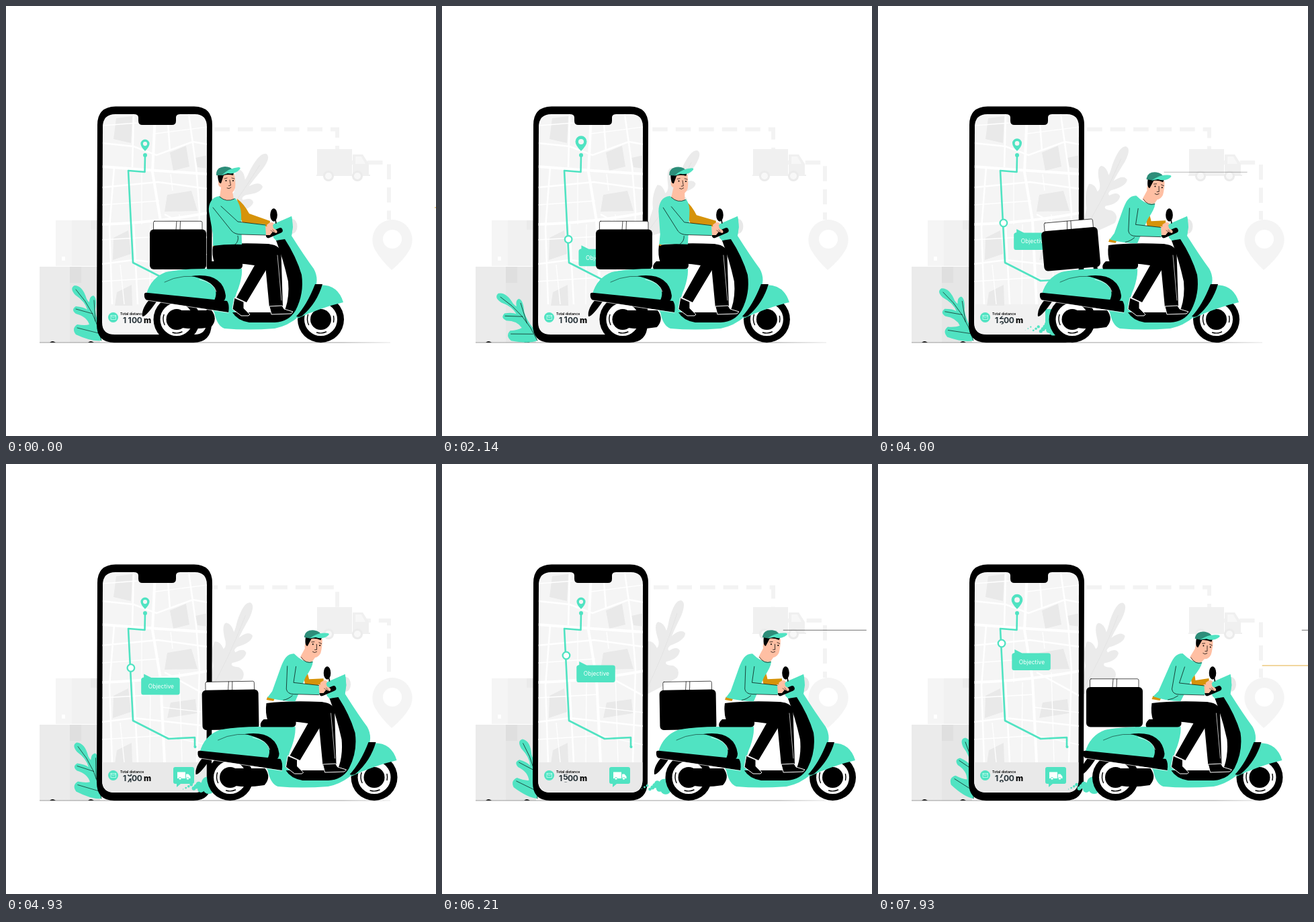
Recreate the animation shown at these times as an HTML page. Size 640x640 px, loop 8000 ms.

```html
<!DOCTYPE html>
<html lang="en">
<head>
<meta charset="utf-8">
<title>Delivery tracking</title>
<style>
html, body { margin: 0; width: 100%; height: 100%; overflow: hidden; background: #fff; }
svg { display: block; width: 100vw; height: 100vh; }
text { font-family: Inter, "Open Sans", sans-serif; }
.teal { fill: #50e3c2; }
.skin { fill: #ffbfa3; }
.gold { fill: #d6930a; }
.line { fill: none; stroke: #000; stroke-width: .7; stroke-linecap: round; stroke-linejoin: round; }
.num { font-weight: 700; font-size: 12px; fill: #263238; text-anchor: middle; }
</style>
</head>
<body>
<svg viewBox="0 0 640 640">
  <defs>
    <clipPath id="screen"><path d="M163 161H281Q299 161 299 180L298.500 471Q298 489 280 489H162Q143 489 143 471L144 180Q144 161 163 161Z"/></clipPath>
    <clipPath id="slot"><rect x="180" y="461.800" width="8.200" height="11.600"/></clipPath>
    <linearGradient id="fade"><stop offset=".86" stop-color="#777"/><stop offset="1" stop-color="#ddd"/></linearGradient>
    <g id="wheel">
      <circle r="34.500"/>
      <circle r="24.500" fill="#fff"/>
      <circle r="15.500"/>
      <path class="line" stroke-width="1.300" style="stroke-width:1.400" d="M-19 -7A20 20 0 0 0 -18 8M-6 19.500A20 20 0 0 0 8 18.500M19 4A20 20 0 0 0 19 -5"/>
    </g>
  </defs>

  <!-- backdrop -->
  <g fill="none" stroke="#f3f3f3" stroke-width="6" stroke-dasharray="22.500 12">
    <path class="dash" d="M276 183.500H493V213"/>
    <path class="dash" d="M503.500 233H570V318"/>
  </g>
  <g fill="#f0f0f0">
    <path d="M463 213H515V252H463ZM516 221H531L540 235V252H516Z"/>
    <path fill="#f7f7f7" d="M520 224H529L535 235H520Z"/>
    <path d="M462 251H542V253H462Z"/>
    <g fill="#f8f8f8" stroke="#ebebeb" stroke-width="3"><circle cx="480" cy="253" r="6.500"/><circle cx="523" cy="253" r="6.500"/></g>
  </g>
  <path fill="#f4f4f4" fill-rule="evenodd" d="M575 318A30 30 0 0 1 600 364Q592 378 574 393Q558 378 550 364A30 30 0 0 1 575 318ZM575 333A14 14 0 1 0 575 361A14 14 0 1 0 575 333Z"/>
  <g id="greyLeaf">
    <path fill="#ebebeb" d="M300 345Q322 335 350 318Q356 306 344 300Q330 300 334 294Q352 290 354 278Q350 270 338 278Q334 275 340 270Q362 262 362 252Q356 244 342 256Q346 246 356 226Q364 206 356 203Q346 202 338 232Q336 244 334 248Q330 236 322 235Q314 238 322 262Q324 270 320 274Q314 262 306 264Q300 280 306 300Z"/>
    <path fill="none" stroke="#e0e0e0" stroke-width=".7" d="M302 340Q328 290 350 222"/>
  </g>
  <path fill="#f5f5f5" d="M74 319H137V388H74Z"/>
  <path fill="#f1f1f1" d="M98 319H137V388H98Z"/>
  <path fill="#ebebeb" d="M126 319H137V333H126Z"/>
  <path fill="#fff" d="M83 373H88V379H83ZM74 387H137V388H74Z"/>
  <path fill="#ebebeb" d="M50 388H140V501H50Z"/>
  <path fill="#e6e6e6" d="M95 388H140V501H95Z"/>
  <path fill="#dfdfdf" d="M95 388H112V412H95Z"/>
  <path d="M65 501Q69 497 74 501ZM122 501Q126 497 131 501Z"/>
  <rect x="50" y="500.600" width="522" height=".7" fill="url(#fade)"/>
  <path id="dark" stroke="#333" stroke-width=".7"/>
  <path id="amber" stroke="#e0a526" stroke-width=".9"/>

  <g id="leaf">
    <path class="teal" d="M142 498Q128 500 104 489Q97 480 106 474Q118 476 124 474Q120 462 104 458Q96 452 104 447Q116 448 121 452Q118 440 103 430Q94 420 102 416Q114 416 120 436Q122 440 124 441Q124 432 130 431Q136 434 133 452Q134 466 140 478Z"/>
    <path class="line" style="stroke-width:.6" d="M142 498Q134 455 104 422M133 469L131 438M129 458L104 451M138 487L106 479"/>
  </g>

  <!-- phone -->
  <path d="M163 149.500H280Q307 150 307 177L306 474Q305 501 279 501H161Q135 501 135 474L136 177Q136 150 163 149.500Z"/>
  <g clip-path="url(#screen)">
    <path fill="#f5f5f5" d="M140 158H302V492H140Z"/>
    <path fill="#e9e9e9" d="M164 167L188 164L186 204L160 198ZM244 218L268 208L273 239L249 245ZM240 281L276 275L285 305L236 306ZM160 345L182 334L186 369L159 378ZM245 355L282 350L284 371L240 378ZM165 426L187 415L188 446L162 446ZM282 226L300 222V242L285 240Z"/>
    <g fill="none" stroke="#fff">
      <path stroke-width="4" d="M143 239Q220 245 300 250M222 161L218 247L230 320L236 444M143 325Q220 323 300 308"/>
      <path stroke-width="2.500" d="M143 204L190 209L224 222L278 202L300 206M190 161L188 240M143 270L226 262L300 272M236 310L300 345M143 384L190 378L300 390M161 240L154 330L158 444M190 325L196 444M240 161L244 215M272 161L283 240L288 305L284 444"/>
      <path stroke-width="1.300" d="M143 178L222 172M222 190L300 180M143 296L228 290M202 244V325M143 348L232 343M232 362L300 370M143 410L235 404L300 418M215 325L214 444M258 310L262 444M245 250L248 275M170 385L176 444"/>
    </g>
    <g class="teal">
      <path fill="none" stroke="#50e3c2" stroke-width="2.600" stroke-linejoin="round" d="M207 222L206.500 247L182 245L189 382L242 409L281 407V421"/>
      <circle cx="207" cy="222" r="3"/><circle cx="281.500" cy="421" r="2"/>
      <path id="pin" fill-rule="evenodd" d="M0 0Q-9 -9 -9 -15A9 9 0 0 1 9 -15Q9 -9 0 0ZM0 -19.200A4.300 4.300 0 1 0 0 -10.600A4.300 4.300 0 1 0 0 -19.200Z"/>
    </g>
    <circle id="ring" r="5.300" fill="#fff" stroke="#50e3c2" stroke-width="2.300"/>
    <g id="bubble">
      <path class="teal" d="M4 -4.500L15 1H54Q57.500 1 57.500 4V23Q57.500 26.500 54 26.500H3Q0 26.500 0 23V4Q0 1 4 .5Z"/>
      <text id="goal" x="10.500" y="17" font-size="8.400" letter-spacing=".1" fill="#fff">Objective</text>
    </g>
    <path id="panel" fill="#e9e9e9" d="M140 444H302V492H140Z"/>
    <circle class="teal" cx="159.500" cy="463.500" r="7.500"/>
    <path fill="none" stroke="#d8fff6" stroke-width=".7" d="M156 460.500H163.500V466.500H156ZM156 460.500L158 463H161.500L163.500 460.500"/>
    <text x="170" y="460" font-size="5.200" font-weight="600">Total distance</text>
    <g class="num">
      <text x="176.500" y="472.300">1</text>
      <g clip-path="url(#slot)"><g id="reel"></g></g>
      <text x="191" y="472.300">0</text><text x="198.700" y="472.300">0</text>
      <text x="210.500" y="472.300" fill="#000" font-weight="800">m</text>
    </g>
    <path class="teal" d="M252 451H277Q280 451 280 454V473Q280 476 277 476H260L254 481V476H252Q249 476 249 473V454Q249 451 252 451Z"/>
    <path fill="#fff" d="M255 458.500H267V468H255ZM268 461.500H271.500L274.500 465V468H268Z"/>
    <g fill="#fff" stroke="#50e3c2" stroke-width=".8"><circle cx="259" cy="468.300" r="1.900"/><circle cx="270.500" cy="468.300" r="1.900"/></g>
  </g>
  <path d="M190 158H259V161Q253 161 253 166V171Q253 177 247 177H203Q197 177 197 171V166Q197 161 190 161Z"/>

  <g id="smoke" class="teal"></g>

  <!-- scooter and rider -->
  <g id="ride">
    <path d="M216 434Q201 450 203 462Q208 463 224 440Z"/>
    <use href="#wheel" x="254" y="466.500"/>
    <path d="M250 453L306 453Q316 466 305 478Q280 482 262 479Z"/>
    <use href="#wheel" x="468.500" y="466.500"/>
    <g id="box">
      <path d="M287 385H293V401H287Z"/>
      <path class="line" style="fill:#fff" d="M221 319.800H290Q292 320 292 322V333H219.500V322Q219.500 320 221 319.800ZM254 320L253 333M259.500 320L259 333"/>
      <rect x="214" y="332" width="84" height="59.500" rx="6"/>
    </g>
    <ellipse cx="426" cy="328" rx="7.500" ry="11" fill="#e8e8e8"/>
    <!-- body -->
    <path class="teal" d="M238 396Q262 391 300 391H351Q352 402 346 420Q337 440 340 454Q352 466 368 469H406Q424 464 430 452Q440 430 434 405Q424 372 403 350L398 345L397 325L425 313L427 329L425 342Q444 372 458 391Q466 405 460 422Q452 446 436 462Q420 476 400 480Q360 483 325 480Q314 476 310 456L300 440L209 429Q216 404 238 396Z"/>
    <path d="M402 349L415 347Q432 373 440 400Q444 428 431 453Q421 470 400 471H362Q344 468 337 456H395Q410 458 416 450Q422 432 420 410Q413 378 402 349Z"/>
    <path class="teal" d="M209 429Q216 404 240 396Q280 388 306 402Q322 411 325 430L322 440Z"/>
    <path d="M276 402Q322 396 327 431Q327 438 322 440L310 438Q322 412 276 402Z"/>
    <path class="line" d="M236 411Q262 397 300 405" style="stroke-width:.5"/>
    <path class="line" d="M288 407Q309 411 313 425" style="stroke:#fff"/>
    <path d="M206 428Q207 426 212 427L329 439Q333 445 331 456L210 438Q205 436 206 428Z"/>
    <path class="line" style="stroke:#fff" d="M210 438L331 456.500"/>
    <!-- front fender -->
    <path class="teal" d="M434 465Q446 444 460 416Q493 411 502 441Q468 449 434 465Z"/>
    <path d="M432 462Q448 445 460 414L471 414Q463 442 441 461Q437 464 432 462Z"/>
    <path d="M304 380H346Q353 380 352 387Q351 392 345 391.500H300Q297 386 304 380Z"/>
    <path id="farArm" class="gold"/>
    <!-- legs -->
    <path d="M385 354Q409 354 409.500 369L412 447L392 449L386 386L378 360Z"/>
    <g stroke="#fff" stroke-width="1">
      <path d="M392 447L411 446L414 451L427 455L424 458L395 459Z"/>
      <path d="M340 434L354 440V450L363 459L361 461L350 461L337 451Z"/>
    </g>
    <path d="M308 356Q340 352 389 354Q404 356 399 373L358 441L343 434L370 386Q345 382 310 382Q306 370 308 356Z"/>
    <path class="line" style="stroke:#fff" d="M404 371L410 438M341 435L355 441"/>
    <path id="waist" class="gold"/>
    <path id="neck" class="skin"/>
    <path id="torso" class="teal"/>
    <path id="collar" class="line"/>
    <g id="head">
      <path class="skin" d="M319 250H340Q342 262 341 271Q338 280 330 279Q322 277 320 270Q315 268 316 262Z"/>
      <path d="M315 249Q326 246 339 248L338 252Q331 250 324 252L322 258L320 264Q315 264 315 249Z"/>
      <path fill="#2d8d79" d="M313 252Q312 240 326 239Q335 239 338 245L322 252Z"/>
      <path class="teal" d="M321 252Q332 241 346 240Q350 240 348 243Q341 251 330 249Z"/>
      <path class="line" d="M325 257L329 256M336 256L340 257M333 259L334.500 267L331.500 267.500M329 271Q332 273 335 270"/>
      <circle cx="327.500" cy="260" r="1"/><circle cx="338" cy="260" r="1"/>
    </g>
    <!-- handlebar -->
    <path class="skin" d="M388 326Q394 320 398 323L400 332L390 333Z"/>
    <ellipse cx="398.500" cy="311" rx="5.300" ry="9.700"/>
    <path class="line" style="stroke-width:1.600" d="M401 318L403.500 332"/>
    <path class="teal" d="M397 326L425 313Q428 322 425 342L402 349Z"/>
    <path class="line" style="stroke-width:7.500" d="M390.500 341.500L408 334"/>
    <path class="skin" d="M385 328Q395 327 403 334Q405 338 401 338L397 336L393 341H386Z"/>
    <path class="line" style="stroke-width:.5" d="M397 336L394 334M401 338L397 333"/>
    <path id="arm" class="teal"/>
    <path id="armLine" class="line"/>
  </g>
</svg>
<script>
const LOOP = 8000;
const $ = id => document.getElementById(id);
const set = (el, name, value) => el.setAttribute(name, value);
const clamp = v => Math.max(0, Math.min(1, v));

// Smooth track through [time, value] pairs, without overshoot
function track(...k) {
  const d = i => (k[i + 1][1] - k[i][1]) / (k[i + 1][0] - k[i][0]);
  const slope = i => {
    if (i === 0 || i === k.length - 1) return 0;
    const a = d(i - 1), b = d(i);
    return a * b <= 0 ? 0 : 2 * a * b / (a + b);
  };
  return t => {
    const last = k.length - 1;
    if (t <= k[0][0]) return k[0][1];
    if (t >= k[last][0]) return k[last][1];
    let i = 0;
    while (t > k[i + 1][0]) i++;
    const h = k[i + 1][0] - k[i][0], u = (t - k[i][0]) / h, w = 1 - u;
    return w * w * ((1 + 2 * u) * k[i][1] + u * h * slope(i))
      + u * u * ((3 - 2 * u) * k[i + 1][1] - w * h * slope(i + 1));
  };
}

const rideX = track([-600, -2], [0, 0], [1210, 7], [2570, 17.5], [3070, 18.7], [4000, 35], [4930, 79.5], [5140, 90], [6210, 113], [6500, 114.5], [7930, 99.5], [8300, 96]);
const lean = track([1210, 0], [3070, .5], [4000, .87], [6210, .86], [7930, 1]);
const boxX = track([0, 0], [1210, .3], [3070, -.5], [4000, -4], [4930, -1.5], [6210, -3], [7930, -3.5]);
const boxY = track([3070, .5], [4000, 0], [4930, 4], [6210, 4], [7930, 0]);
const boxTurn = track([3070, 0], [4000, -5], [4930, -1], [6210, -1], [7930, 0]);
const leafTurn = track([0, 0], [1210, -12.8], [1900, -14], [3070, -10], [4000, -5.5], [4930, 2.3], [6210, 12], [7930, 18.5]);
const greyTurn = track([0, 13.5], [1210, 12.1], [3070, 8.1], [4000, 5.6], [4930, 3.1], [6210, 0], [7930, 3.5]);
const pinSize = track([0, .73], [1210, 1], [3070, .85], [4000, .78], [4930, .73], [6210, .73], [7930, .93]);
const ringY = track([0, 359], [1210, 354], [3070, 338], [4000, 323], [4930, 303.5], [6210, 285], [7930, 267]);
const digit = track([1500, 1], [3070, 1.6], [4000, 2.5], [4930, 3.6], [6210, 5.2], [7930, 7.45]);
const smokeSize = track([2700, 0], [3070, .25], [4000, .6], [4930, 1]);

// Upright and leaning pose of each morphing part
const poses = {
  torso: ["M318 283C306 284 301 294 302 306L308 340L308 357Q330 354 351 355L350 310Q349 294 341 286Q328 294 318 283Z",
          "M354 282C343 282 339 290 333 304L318 338L310 346Q330 353 351 353L369 318Q381 304 383 295Q370 298 354 282Z"],
  neck: ["M320 270L318 285Q328 294 339 287L337 276Z", "M374 272L365 287Q372 300 382 295L390 286Z"],
  collar: ["M318 284Q328 293 340 287", "M366 288Q373 299 382 296"],
  farArm: ["M344 287Q354 294 362 309L393 320L392 330L352 322L346 310Z", "M371 310Q372 314 373 322L393 319L394 332L368 330L366 318Z"],
  waist: ["M308 356L310 356L309 358L308 358Z", "M310 345L322 348L320 352L308 350Z"],
  arm: ["M306 290Q300 302 312 316L336 335Q341 340 350 340L387 341L386 325L349 322L330 298Z",
        "M348 290Q342 302 341 316L338 335Q339 343 349 343L387 344L386 330L350 326L362 302Z"],
  armLine: ["M308 300L336 335Q341 340 350 340L386 341M320 298L345 321L386 326M345 342Q347 350 341 355",
            "M344 301L338 335Q339 343 349 343L386 344M357 302L349 326L386 330M347 345Q340 350 332 351"]
};
const morph = (a, b, u) => {
  const n = b.match(/[\d.]+/g);
  let i = 0;
  return a.replace(/[\d.]+/g, v => (+v + (n[i++] - v) * u).toFixed(2));
};

const add = (parent, name) => parent.appendChild(document.createElementNS("http://www.w3.org/2000/svg", name));
for (let n = 0; n < 10; n++) {
  const el = add($("reel"), "text");
  el.textContent = n;
  set(el, "x", 184);
  set(el, "y", 472.3 + n * 12);
}
const puffs = Array.from({ length: 14 }, () => add($("smoke"), "circle"));
const dashes = document.querySelectorAll(".dash");

function streak(el, x, y, opacity) {
  set(el, "d", `M${x} ${y}h124`);
  set(el, "opacity", clamp(opacity));
}

function draw(t) {
  const x = rideX(t), l = lean(t);
  set($("ride"), "transform", `translate(${x} 0)`);
  set($("box"), "transform", `translate(${boxX(t)} ${boxY(t)}) rotate(${boxTurn(t)} 256 361)`);
  set($("head"), "transform", `translate(${57 * l} ${11 * l ** 1.6}) rotate(${11 * l} 330 262)`);
  for (const id in poses) set($(id), "d", morph(...poses[id], l));

  set($("leaf"), "transform", `rotate(${leafTurn(t)} 142 498)`);
  set($("greyLeaf"), "transform", `rotate(${greyTurn(t)} 300 345)`);
  dashes.forEach(el => set(el, "stroke-dashoffset", -t * .0174));

  const y = ringY(t), rx = 182 + (y - 245) * 7 / 137 + .9;
  set($("pin"), "transform", `translate(207 216) scale(${pinSize(t)})`);
  set($("ring"), "transform", `translate(${rx} ${y})`);
  set($("ring"), "opacity", clamp((t - 1000) / 600));
  set($("bubble"), "transform", `translate(${rx + 15.3} ${y + 13.5})`);
  set($("bubble"), "opacity", clamp((t - 800) / 400));
  set($("goal"), "opacity", clamp((t - 950) / 500));
  set($("panel"), "opacity", clamp((t - 3500) / 1200));
  set($("reel"), "transform", `translate(0 ${-12 * digit(t)})`);

  const size = smokeSize(t);
  puffs.forEach((el, i) => {
    const age = (t / 1000 + i / puffs.length) % 1;
    set(el, "cx", 254 + x - 28 - 46 * age ** 1.3);
    set(el, "cy", 484 - (i * 5 % 7) * 2 * (1 - age * .6));
    set(el, "r", size * (10 * (1 - age) ** 1.6 + 1) * clamp((1 - age) * 8));
  });

  const p = t % 2500;
  streak($("amber"), 638 - 66 * (p / 430) ** 2, 300, (900 - p) / 250);
  streak($("dark"), 640 - 132 * (Math.max(0, p - 150) / 1060) ** 2, 247.3, (1650 - p) / 300);
}

const start = performance.now();
function tick() {
  draw((performance.now() - start) % LOOP);
  requestAnimationFrame(tick);
}
tick();
</script>
</body>
</html>
```
